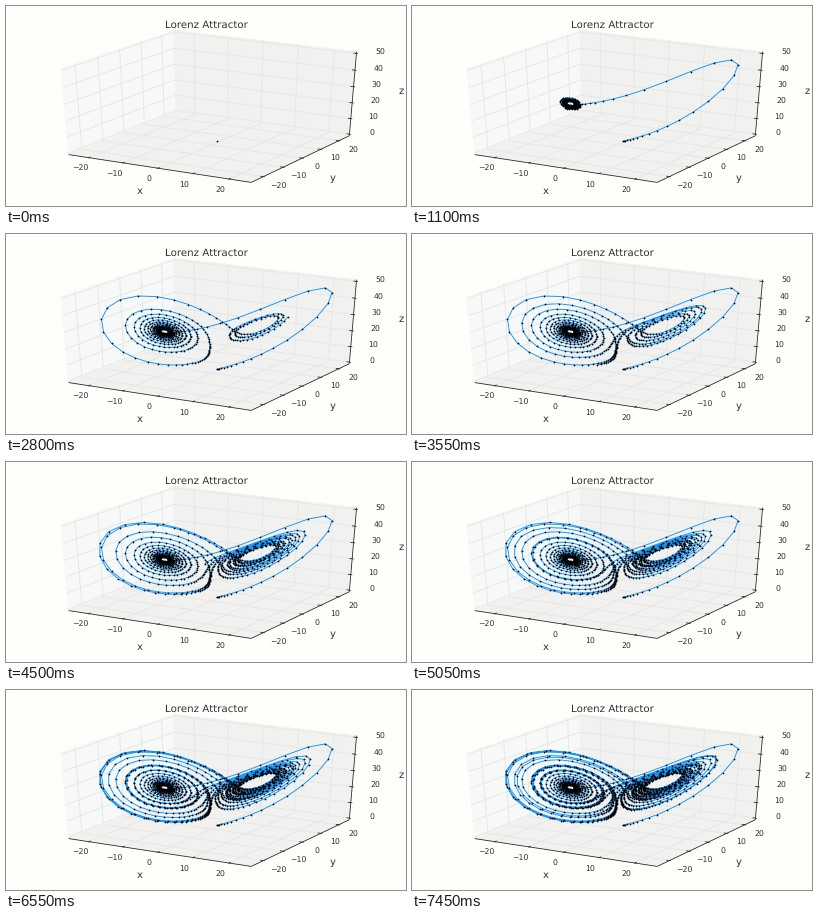
Animation of 400x200 px, one loop 7500 ms. Source, as a matplotlib script:

```python
import numpy as np
import matplotlib.pyplot as plt
from matplotlib.animation import FuncAnimation

W, H, DPI = 400, 200, 72
FRAMES, INTERVAL, STEPS = 150, 50, 10
INK, AXIS, GRID = "#333333", "#262626", "#e7e8e6"
EDGE = 0.5 + 1 / 48          # panes reach slightly past the axis limits
LABEL_GAP = 0.086            # tick labels sit this far outside the box
ELEV, AZIM, DIST = np.radians(30), np.radians(-60), 10

EYE = np.array([np.cos(ELEV) * np.cos(AZIM), np.cos(ELEV) * np.sin(AZIM), np.sin(ELEV)])
RIGHT = np.array([-np.sin(AZIM), np.cos(AZIM), 0])
UP = np.cross(EYE, RIGHT)

plt.rcParams["text.hinting"] = "none"
plt.rcParams["font.family"] = "DejaVu Sans"


def project(points):
    """Perspective view of centred unit-cube points, in pixels."""
    p = np.atleast_2d(points)
    depth = DIST - p @ EYE
    return 205.2 + 2024 * (p @ RIGHT) / depth, 97.6 - 942 * (p @ UP) / depth


def lorenz(n, dt=0.02, sigma=10, rho=28, beta=8 / 3):
    x = y = z = 1.0
    path = [(x, y, z)]
    for _ in range(n - 1):
        x += dt * sigma * (y - x)
        y += dt * (x * (rho - z) - y)
        z += dt * (x * y - beta * z)
        path.append((x, y, z))
    return np.array(path)


fig = plt.figure(figsize=(W / DPI, H / DPI), dpi=DPI, facecolor="#fdfffb")
ax = fig.add_axes([0, 0, 1, 1])
ax.set_xlim(0, W)
ax.set_ylim(H, 0)
ax.axis("off")


def line(points, color, width):
    ax.plot(*project(points), color=color, lw=width, solid_capstyle="butt")


def label(x, y, text, size, va="center"):
    ax.text(x, y, text, fontsize=size, color=INK, ha="center", va=va)


def pane(axis, side, color):
    a, b = [i for i in range(3) if i != axis]
    corners = np.zeros((4, 3))
    corners[:, axis] = side
    corners[:, a] = np.array([-1, 1, 1, -1]) * EDGE
    corners[:, b] = np.array([-1, -1, 1, 1]) * EDGE
    ax.fill(*project(corners), facecolor=color, edgecolor=color, lw=0.8)


pane(0, -EDGE, "#f7f9f9")
pane(1, EDGE, "#f1f2f0")
pane(2, -EDGE, "#f1f2f0")

E = EDGE
# axis, ticks, centre value, grid bend (None = tick), spine, tick direction
AXES = [
    (0, range(-20, 21, 10), 0, [(None, -E, -E), (None, E, -E), (None, E, E)],
     [(-E, -E, -E), (E, -E, -E)], (0, -1, 0)),
    (1, range(-20, 21, 10), 0, [(E, None, -E), (-E, None, -E), (-E, None, E)],
     [(E, -E, -E), (E, E, -E)], (1, 0, 0)),
    (2, range(0, 51, 10), 25, [(-E, -E, None), (-E, E, None), (E, E, None)],
     [(E, E, -E), (E, E, E)], (1, 0, 0)),
]

for axis, ticks, mid, bend, spine, out in AXES:
    for t in ticks:
        c = (t - mid) / 50
        line([[c if v is None else v for v in p] for p in bend], GRID, 1)

for axis, ticks, mid, bend, spine, out in AXES:
    line(spine, AXIS, 0.8)
    for t in ticks:
        base = np.array(spine[0])
        base[axis] = (t - mid) / 50
        step = np.array(out) / 12
        line([base + 0.1 * step, base - 0.2 * step], AXIS, 0.8)
        away = np.sign(base) * LABEL_GAP
        away[axis] = 0
        px, py = (v[0] for v in project(base + away))
        label(px, py + 0.8, str(t).replace("-", "\u2212"), 7.7)

label(133.5, 185.3, "x", 10)
label(326.5, 171.8, "y", 10)
label(395, 85.3, "z", 10)
label(200.1, 21.4, "Lorenz Attractor", 10.3, va="baseline")

path = (lorenz(FRAMES * STEPS) - [0, 0, 25]) / 50
xs, ys = project(path)
curve, = ax.plot([], [], color="#1c96f6", lw=0.95, marker="o", ms=1.75,
                 mfc="black", mec="none")


def update(i):
    n = i * STEPS + 1
    curve.set_data(xs[:n], ys[:n])
    return curve,


anim = FuncAnimation(fig, update, frames=FRAMES, interval=INTERVAL,
                     repeat=True, repeat_delay=0)
plt.show()
```
